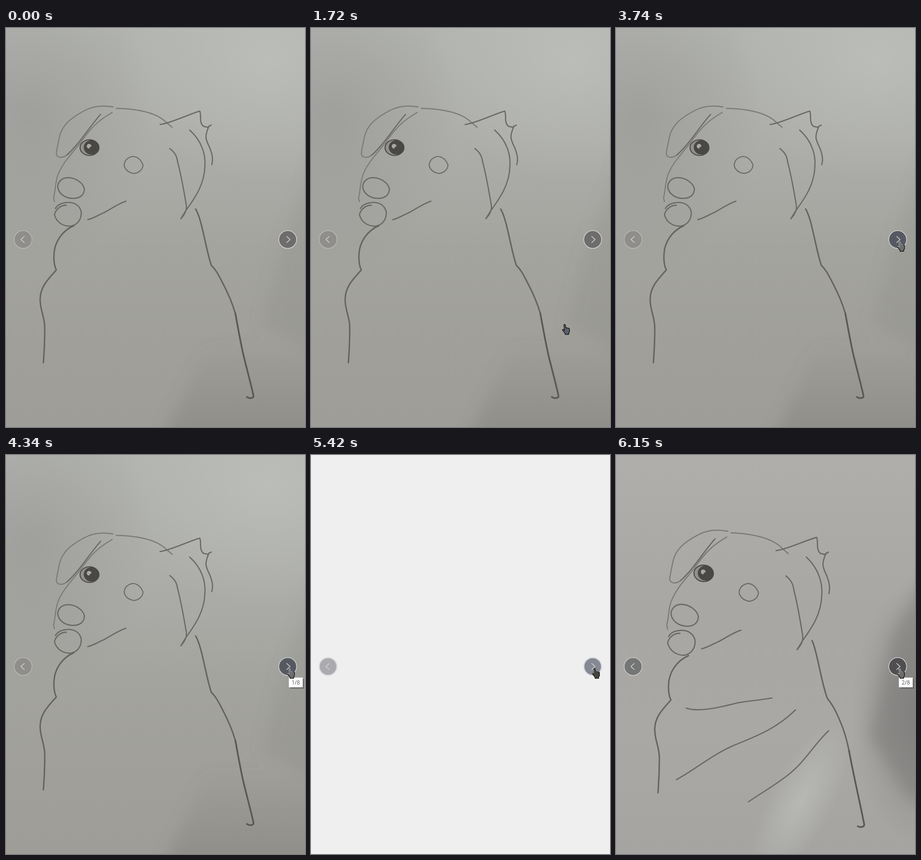
An HTML page that plays this animation: 648 by 864 pixels, repeating every 8 s.

```html
<!DOCTYPE html>
<html lang="en">
<head>
<meta charset="utf-8">
<title>Dog sketch slideshow</title>
<style>
html, body { margin: 0; width: 100%; height: 100%; overflow: hidden; background: #efefef; }
svg { display: block; width: 648px; height: 864px; }
.pencil { fill: none; stroke: #6a6965; stroke-width: 2.6; stroke-linecap: round; stroke-linejoin: round; }
.faint { stroke: #7c7b77; stroke-width: 2.4; }
.bold { stroke: #65645f; stroke-width: 3.1; }
.heavy { stroke: #5a5955; stroke-width: 3.6; }
.chevron { fill: none; stroke: #d4d4d1; stroke-width: 1.6; }
.tip text { font: 12px "Open Sans", "Noto Sans", sans-serif; fill: #555; text-anchor: middle; }

/* One shared clock; step-end keeps the cuts hard. */
.page1, .page2, .prev, .next, .click, .tip, .cursor, .hand, .finger {
  animation: 8s step-end -2ms infinite;
}
.page1 { animation-name: page1; }
.page2 { animation-name: page2; }
.prev { animation-name: prev; }
.next { animation-name: next; }
.click { animation-name: click; }
.first { animation-name: first; }
.second { animation-name: second; }
.cursor { animation-name: move; }
.hand { animation-name: hand; }
.finger { animation-name: finger; }

@keyframes page1 { 0% { opacity: 1 } 67.75%, 100% { opacity: 0 } }
@keyframes page2 { 0% { opacity: 0 } 68.625%, 100% { opacity: 1 } }
@keyframes prev {
  0% { fill: #8f8e8a; stroke: #b9b9b5; stroke-width: 1.5px }
  67.75% { fill: #aaaaaf; stroke: #dddde0; stroke-width: 2.5px }
  68.625%, 100% { fill: #747675; stroke: #c9c9c8; stroke-width: 1.5px }
}
@keyframes next {
  0% { fill: #6e6d6b; stroke: #d2d2d0; stroke-width: 1.5px }
  45% { fill: #6e6d6b; stroke: #d2d2d0; stroke-width: 1.5px; animation-timing-function: steps(2, jump-both) }
  46.75% { fill: #575962; stroke: #d2d2d0; stroke-width: 1.5px }
  66.875% { fill: #4b4e59; stroke: #d2d2d0; stroke-width: 1.5px }
  67.75% { fill: #858993; stroke: #dddde0; stroke-width: 2.5px }
  68.625%, 100% { fill: #4f4f51; stroke: #d2d2d0; stroke-width: 1.5px }
}
@keyframes click { 0% { opacity: 0 } 66.875% { opacity: 1 } 67.75%, 100% { opacity: 0 } }
@keyframes first {
  0% { opacity: 0 }
  52.5% { opacity: 0; animation-timing-function: steps(2, jump-both) }
  54.25% { opacity: 1 }
  66.875%, 100% { opacity: 0 }
}
@keyframes second {
  0% { opacity: 0 }
  74.375% { opacity: 0; animation-timing-function: steps(3, jump-both) }
  76.875%, 100% { opacity: 1 }
}
@keyframes move {
  0% { opacity: 0; transform: translate(600px, 722px) }
  13.125% { opacity: 1; transform: translate(600px, 722px); animation-timing-function: steps(3, jump-end) }
  15.625% { transform: translate(543px, 653px) }
  18.125% { transform: translate(543px, 653px); animation-timing-function: steps(4, jump-both) }
  21.5% { transform: translate(544px, 641px) }
  24.875% { transform: translate(544px, 641px); animation-timing-function: steps(9, jump-both) }
  33.25% { transform: translate(599px, 593px); animation-timing-function: steps(2, jump-end) }
  34.875% { transform: translate(602px, 588px) }
  37.375% { transform: translate(602px, 588px); animation-timing-function: steps(6, jump-both) }
  42.5% { transform: translate(608px, 500px); animation-timing-function: steps(5, jump-end) }
  46.75%, 100% { opacity: 1; transform: translate(609px, 461px) }
}
@keyframes hand {
  0% { fill: #5c5f69 }
  46% { fill: #6c6d71 }
  67.75% { fill: #46463f }
  68.625%, 100% { fill: #6b6b6b }
}
@keyframes finger { 0% { opacity: 0 } 46% { opacity: 1 } 67.75% { opacity: .3 } 68.625%, 100% { opacity: 1 } }
</style>
</head>
<body>
<svg viewBox="0 0 648 864">
  <defs>
    <linearGradient id="paper1" x2="0" y2="1">
      <stop stop-color="#b2b4b0"/>
      <stop offset=".3" stop-color="#acada9"/>
      <stop offset=".55" stop-color="#a4a49f"/>
      <stop offset=".8" stop-color="#a09f9a"/>
      <stop offset="1" stop-color="#9e9d98"/>
    </linearGradient>
    <linearGradient id="paper2" x2="0" y2="1">
      <stop stop-color="#afaeab"/>
      <stop offset=".4" stop-color="#a8a7a4"/>
      <stop offset=".7" stop-color="#a9a8a5"/>
      <stop offset="1" stop-color="#a5a4a1"/>
    </linearGradient>
    <linearGradient id="wedge" x2="0" y2="1">
      <stop stop-color="#7c7b77" stop-opacity="0"/>
      <stop offset="1" stop-color="#7c7b77" stop-opacity=".5"/>
    </linearGradient>
    <radialGradient id="light">
      <stop stop-color="#c0c2be" stop-opacity=".65"/>
      <stop offset="1" stop-color="#c0c2be" stop-opacity="0"/>
    </radialGradient>
    <radialGradient id="shade">
      <stop stop-color="#787675" stop-opacity=".6"/>
      <stop offset="1" stop-color="#787675" stop-opacity="0"/>
    </radialGradient>
    <filter id="soft" x="-40%" y="-40%" width="180%" height="180%"><feGaussianBlur stdDeviation="16"/></filter>
    <filter id="lead" x="-5%" y="-5%" width="110%" height="110%"><feGaussianBlur stdDeviation=".75"/></filter>

    <g id="head">
      <g class="faint">
        <path d="M232 171C205 166 185 171 170 179C140 195 122 210 116 235C112 255 110 262 109 273C112 283 124 281 132 275"/>
        <path d="M230 183C200 200 185 215 160 250C140 275 125 290 115 312C106 330 108 350 103 368L105 376"/>
        <path d="M239 174C280 175 325 182 347 204L360 215"/>
      </g>
      <path d="M132 275C160 250 180 215 205 187"/>
      <path d="M334 209C360 205 395 187 420 180C424 190 418 205 428 213L437 215L445 210M440 212C430 235 432 240 441 258C448 275 449 285 446 296"/>
      <path d="M398 221C425 245 433 275 431 300C430 340 408 370 390 395L379 413"/>
      <path d="M355 261C364 268 370 275 372 290C380 320 386 355 391 385C392 395 388 403 380 412"/>
      <path d="M112 344C113 331 122 324 136 324C152 325 168 336 170 349C169 362 160 369 146 369C128 369 114 359 112 344Z"/>
      <path d="M131 384C120 383 108 392 105 404C109 421 124 430 141 429C156 426 164 413 163 398C160 384 147 376 131 378C120 379 112 382 107 391"/>
      <path d="M256 297C257 286 264 280 275 278C285 279 293 286 297 297C296 307 288 314 277 315C266 313 258 307 256 297Z" stroke-width="2.2"/>
      <path d="M177 415C188 413 200 405 212 400C229 391 244 380 260 375"/>
      <g stroke="none">
        <ellipse cx="181" cy="259" rx="20.5" ry="17" fill="#92918c" stroke="#4b4946" stroke-width="2.2"/>
        <ellipse cx="185" cy="258.5" rx="16.5" ry="15.5" fill="#4a4845"/>
        <circle cx="180" cy="256" r="5" fill="#aaa9a5"/>
        <circle cx="184" cy="260" r="3" fill="#4a4845"/>
      </g>
    </g>
    <path id="chest" d="M147 428C120 440 105 465 104 490C103 508 106 518 109 524C90 545 73 562 74 590C75 615 84 625 84 650C84 690 82 710 81 725"/>
  </defs>

  <g class="page1">
    <rect width="648" height="864" fill="url(#paper1)"/>
    <ellipse cx="570" cy="70" rx="330" ry="260" fill="url(#light)"/>
    <ellipse cx="50" cy="190" rx="270" ry="330" fill="url(#shade)" opacity=".45"/>
    <g filter="url(#soft)">
      <path d="M440 680L700 700V910H330Z" fill="url(#wedge)"/>
      <path d="M690 230L600 470L555 640L690 720Z" fill="#84837f" opacity=".22"/>
    </g>
    <g class="pencil" filter="url(#lead)">
      <use href="#head"/>
      <use href="#chest" class="bold"/>
      <path class="bold" d="M411 392C425 415 432 475 445 514C456 524 462 538 470 553C482 576 491 597 497 618"/>
      <path class="heavy" d="M497 618C503 650 508 680 515 710C523 743 532 775 536.5 797C536 802 528 803 522 799"/>
    </g>
  </g>

  <g class="page2">
    <rect width="648" height="864" fill="url(#paper2)"/>
    <ellipse cx="400" cy="750" rx="70" ry="190" fill="url(#light)" transform="rotate(28 400 750)"/>
    <ellipse cx="660" cy="560" rx="150" ry="290" fill="url(#shade)"/>
    <path d="M700 210L600 390L550 610L640 750H700Z" fill="#757371" opacity=".45" filter="url(#soft)"/>
    <g class="pencil" filter="url(#lead)">
      <use href="#head" transform="matrix(1.024 .02 -.002 1.047 5.2 -18.5)"/>
      <use href="#chest" class="bold" transform="translate(10 6.5)"/>
      <path class="bold" d="M425 402C437 428 444 490 458 527C470 541 477 556 483 570C493 592 500 615 505 640"/>
      <path class="heavy" d="M505 640C512 680 528 750 538 800C538 806 530 807 524 804"/>
      <path d="M152 548C180 558 230 545 262 537C290 532 320 530 338 526"/>
      <path d="M131 703C170 682 210 648 255 629C300 610 345 595 389 552"/>
      <path d="M461 597C430 625 410 665 370 695C340 718 310 735 287 751"/>
    </g>
  </g>

  <circle class="prev" cx="37" cy="458" r="19.3"/>
  <path class="chevron" d="M40 451L32.5 458L40 465"/>
  <circle class="next" cx="610.5" cy="458" r="19.3"/>
  <circle class="click" cx="613" cy="461" r="11" fill="#c3c41f"/>
  <path class="chevron" d="M608 451L615.5 458L608 465"/>

  <g class="tip first">
    <path d="M616 485H646V506H616Z" fill="#55565a" opacity=".6"/>
    <path d="M613 482H643V503H613Z" fill="#fff"/>
    <text x="628" y="496.5">1/8</text>
  </g>
  <g class="tip second">
    <path d="M616 485H646V506H616Z" fill="#55565a" opacity=".6"/>
    <path d="M613 482H643V503H613Z" fill="#fff"/>
    <text x="628" y="496.5">2/8</text>
  </g>

  <g class="cursor" stroke-linejoin="round">
    <path class="hand" stroke="#101010" stroke-width="1.3" d="M4 2Q5 -.2 7 1.5L8.5 8.5Q10 7 11.2 9Q12.8 7.5 13.8 9.5Q16 8.5 16.3 11V17L14.5 19.5V22.5H6.5V20L1.5 14Q.5 11 3 11.5L5.5 13.5Z"/>
    <path class="finger" fill="none" stroke="#dededc" d="M1.5 13Q.5 11 3 11.5L5.5 13.5L4 2Q5 -.2 7 1.5L8.5 8.5Q10 7 11.2 9Q12.8 7.5 13.8 9.5"/>
  </g>
</svg>
</body>
</html>
```
